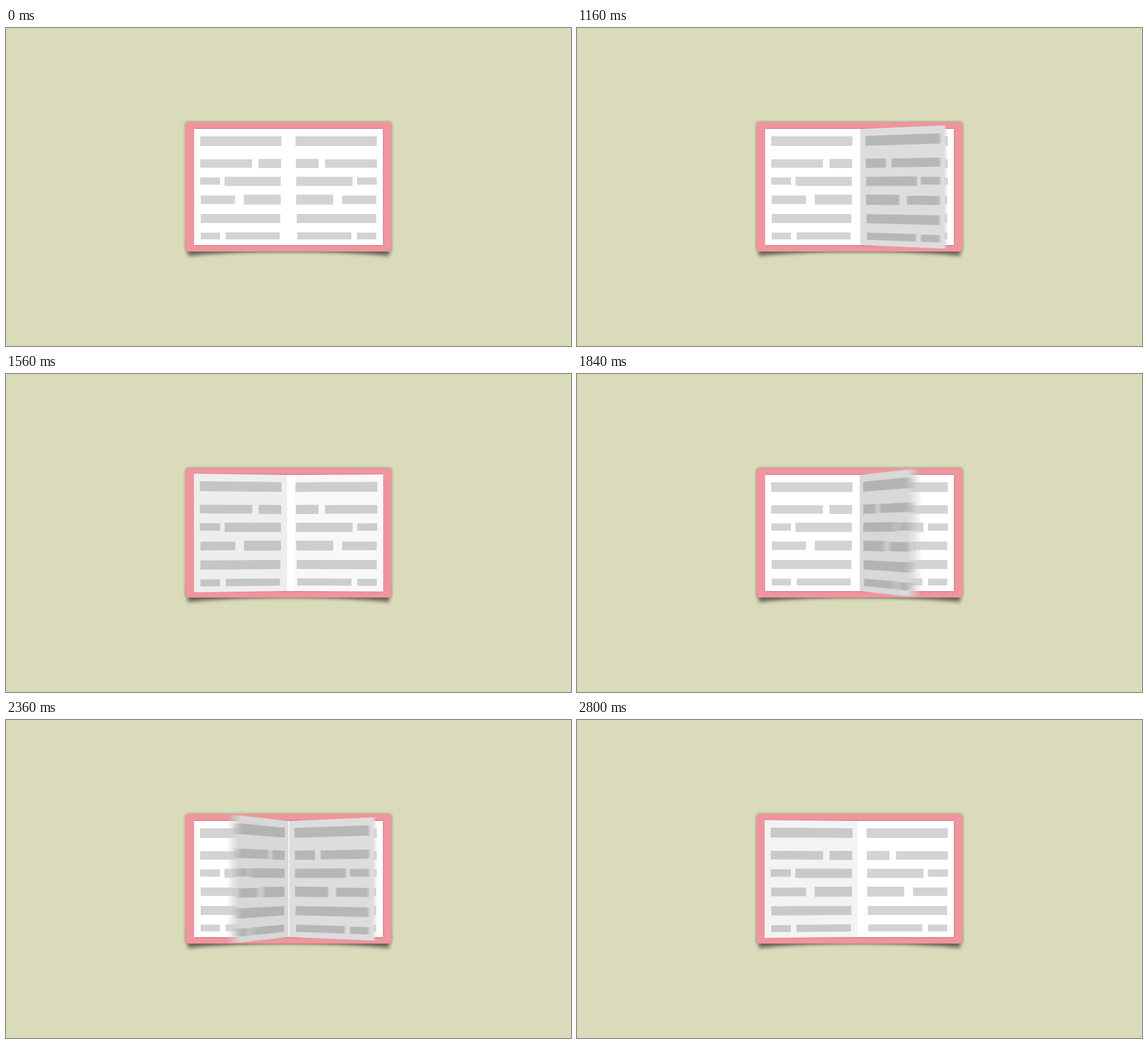
An HTML page with a canvas that plays this animation: 998 px wide and 561 px high, repeating every 2840 ms.

```html
<!DOCTYPE html>
<html lang="en">
<head>
<meta charset="utf-8">
<title>Book with turning pages</title>
<style>
  html, body { margin: 0; width: 100%; height: 100%; overflow: hidden; background: #dadbbb; }
  canvas { display: block; }
</style>
</head>
<body>
<canvas id="stage" width="998" height="561"></canvas>
<script>
const WIDTH = 998, HEIGHT = 561, SPINE = 499, MIDDLE = 280.5;
const LOOP = 2840, STEP = 40, SHUTTER = 20, SAMPLES = 16;
const TURN = 1000, STARTS = [800, 1400, 1800, 2000];
const PAGE_WIDTH = 166.5, PAGE_TOP = 178, PAGE_BOTTOM = 383, CAMERA = 1450;

// Text bars: near and far distance from the spine, top, bottom
const BARS = [
  [12.5, 156, 191, 208],
  [13, 53, 231, 247], [64.5, 156, 231.5, 246.5],
  [13.5, 113, 262.5, 278.5], [121, 156, 263.5, 276.5],
  [13.5, 79, 294, 311.5], [94.5, 155, 295.5, 310.5],
  [14.5, 155, 328, 344],
  [15.5, 111, 360.5, 373], [121, 155, 361, 373]
];

const newLayer = () => {
  const canvas = document.createElement('canvas');
  canvas.width = WIDTH;
  canvas.height = HEIGHT;
  return canvas.getContext('2d');
};
const screen = document.getElementById('stage').getContext('2d');
const base = newLayer();
const scene = newLayer();

// Symmetric cubic Bezier with a strong hold at both ends
function ease(x) {
  const pull = 0.69;
  let low = 0, high = 1;
  for (let i = 0; i < 24; i++) {
    const t = (low + high) / 2, r = 1 - t;
    if (3 * pull * t * r * r + 3 * (1 - pull) * t * t * r + t ** 3 < x) low = t;
    else high = t;
  }
  return low * low * (3 - 2 * low);
}

function drawPage(ctx, angle, hidden, light) {
  const sin = Math.sin(angle), cos = Math.cos(angle);
  const quad = (near, far, top, bottom, level) => {
    near = Math.max(near, hidden);
    if (near >= far) return;
    ctx.beginPath();
    for (const [x, y] of [[near, top], [far, top], [far, bottom], [near, bottom]]) {
      const scale = 1 / (1 - x * sin / CAMERA);
      ctx.lineTo(SPINE + x * cos * scale, MIDDLE + (y - MIDDLE) * scale);
    }
    const v = Math.round(level * light);
    ctx.fillStyle = `rgb(${v},${v},${v})`;
    ctx.fill();
  };
  quad(0, PAGE_WIDTH, PAGE_TOP, PAGE_BOTTOM, 255);
  for (const bar of BARS) quad(...bar, 211);
}

function drawBase(ctx) {
  ctx.fillStyle = '#dadbbb';
  ctx.fillRect(0, 0, WIDTH, HEIGHT);

  // Curled shadow under the lower corners
  ctx.save();
  ctx.filter = 'blur(3px)';
  ctx.fillStyle = 'rgba(0,0,0,.5)';
  ctx.beginPath();
  ctx.moveTo(321, 375);
  ctx.lineTo(677, 375);
  ctx.lineTo(677, 402.5);
  ctx.quadraticCurveTo(SPINE, 385, 321, 402.5);
  ctx.fill();
  ctx.restore();

  ctx.save();
  ctx.shadowColor = 'rgba(0,0,0,.4)';
  ctx.shadowBlur = 5;
  ctx.fillStyle = '#f0959d';
  ctx.beginPath();
  ctx.roundRect(317, 166, 364, 228.5, 5);
  ctx.fill();
  ctx.shadowBlur = 3;
  ctx.fillStyle = '#fff';
  ctx.fillRect(SPINE - PAGE_WIDTH, PAGE_TOP, 2 * PAGE_WIDTH, PAGE_BOTTOM - PAGE_TOP);
  ctx.restore();

  drawPage(ctx, 0, 0, 1);
  drawPage(ctx, Math.PI, 0, 1);
}

function angleAt(time, start) {
  return Math.PI * ease(Math.min(1, Math.max(0, (time - start) / TURN)));
}

function drawScene(time, shutterTime) {
  scene.drawImage(base.canvas, 0, 0);
  STARTS
    .map(start => ({ angle: angleAt(shutterTime, start), middle: angleAt(time, start) }))
    .filter(({ angle }) => Math.sin(angle) > 0.001)
    .sort((a, b) => Math.sin(a.angle) - Math.sin(b.angle))
    .forEach(({ angle, middle }) => {
      // The resting sheets cover the strip next to the spine
      const hidden = (angle < Math.PI / 2 ? 0.82 : 0.48) / Math.sin(angle);
      const tilt = Math.min(middle, Math.PI - middle) * 180 / Math.PI;
      drawPage(scene, angle, hidden, 1 - 0.153 * Math.tanh(tilt / 22));
    });
}

function render(time) {
  for (let i = 0; i < SAMPLES; i++) {
    drawScene(time, time + SHUTTER * ((i + 0.5) / SAMPLES - 0.5));
    screen.globalAlpha = 1 / (i + 1);
    screen.drawImage(scene.canvas, 0, 0);
  }
}

drawBase(base);
const begin = performance.now();
let shown = -1;
function tick() {
  const elapsed = (performance.now() - begin) % LOOP;
  const time = Math.floor(elapsed / STEP) * STEP;
  if (time !== shown) render(shown = time);
  requestAnimationFrame(tick);
}
tick();
</script>
</body>
</html>
```
